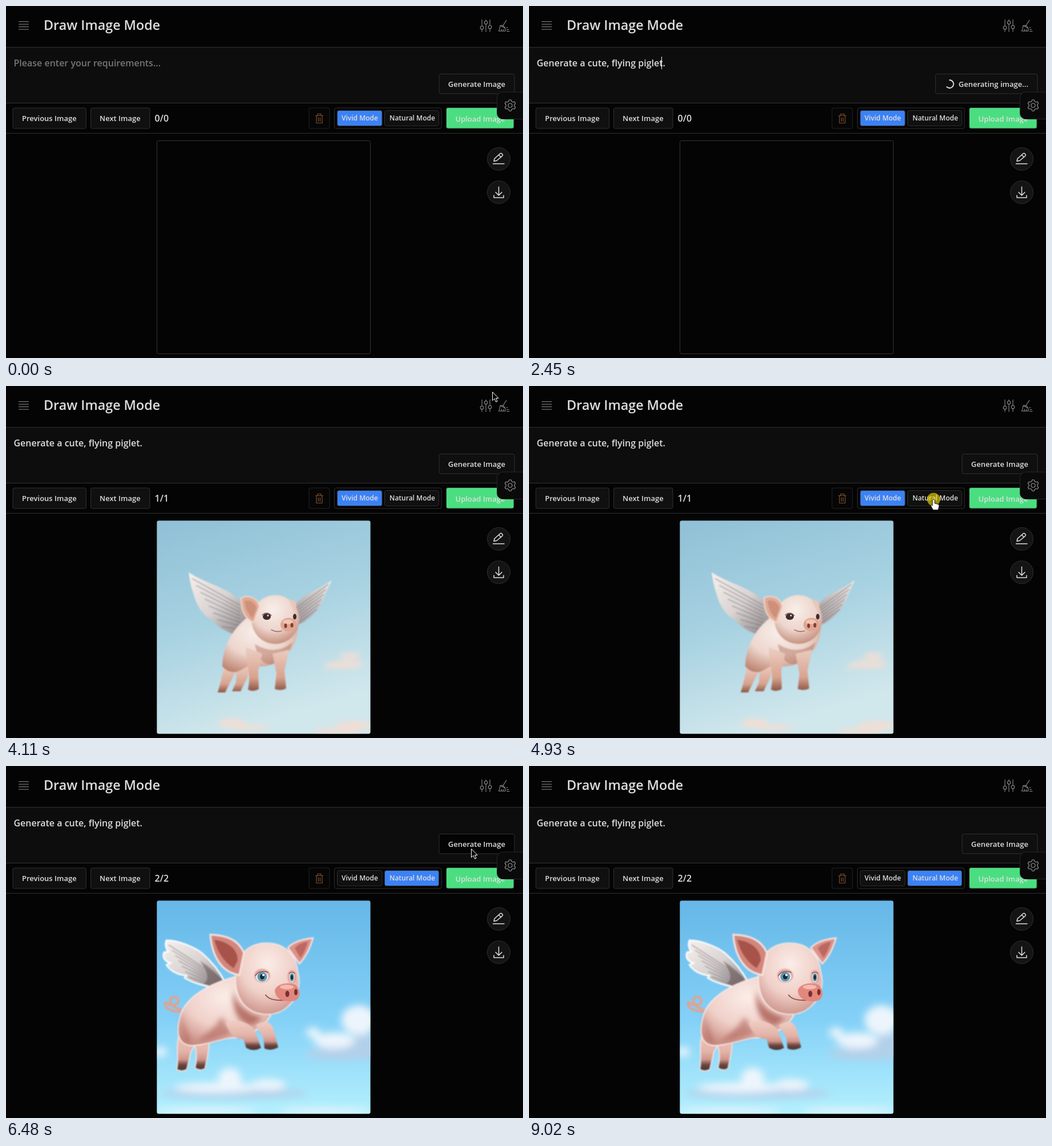
Write an HTML page that moves like this. It is 906 px wide and 618 px high and loops after 9680 ms.

```html
<!DOCTYPE html>
<html lang="en">
<head>
<meta charset="utf-8">
<title>Draw Image Mode</title>
<style>
html, body { margin: 0; width: 100%; height: 100%; overflow: hidden; background: #040404; }
svg { display: block; width: 906px; height: 618px; }
text { font-family: "Open Sans", sans-serif; font-weight: 600; font-size: 13px; fill: #dedede; }
.btn { fill: #101010; stroke: #303030; }
.big { font-size: 16px; }
.small { font-size: 12px; }
.line { fill: none; stroke-linecap: round; stroke-linejoin: round; }
</style>
</head>
<body>
<svg viewBox="0 0 906 618" xmlns="http://www.w3.org/2000/svg">
<defs>
  <clipPath id="frame"><rect x="264.5" y="236.5" width="374" height="374" rx="3"/></clipPath>
  <filter id="b1" x="-20%" y="-20%" width="140%" height="140%"><feGaussianBlur stdDeviation=".8"/></filter>
  <filter id="b4" x="-40%" y="-40%" width="180%" height="180%"><feGaussianBlur stdDeviation="5"/></filter>
  <filter id="b7" x="-40%" y="-40%" width="180%" height="180%"><feGaussianBlur stdDeviation="7"/></filter>
  <linearGradient id="sky1" x1="0" y1="0" x2=".3" y2="1">
    <stop offset="0" stop-color="#90c0d6"/><stop offset=".5" stop-color="#a6d1e1"/><stop offset="1" stop-color="#d0e7ec"/>
  </linearGradient>
  <linearGradient id="sky2" x1="0" y1="0" x2="0" y2="1">
    <stop offset="0" stop-color="#66b7e8"/><stop offset=".55" stop-color="#83d0f7"/><stop offset="1" stop-color="#b4f0fd"/>
  </linearGradient>
  <linearGradient id="leg1" x1="0" y1="0" x2="0" y2="1">
    <stop offset="0" stop-color="#ecd0c5"/><stop offset=".7" stop-color="#d9a28e"/><stop offset="1" stop-color="#8e5546"/>
  </linearGradient>
  <linearGradient id="leg2" x1="0" y1="0" x2="0" y2="1">
    <stop offset="0" stop-color="#efcdc4"/><stop offset=".5" stop-color="#e3b3a8"/><stop offset=".7" stop-color="#d0968b"/><stop offset=".84" stop-color="#6b4640"/><stop offset="1" stop-color="#47302d"/>
  </linearGradient>
  <radialGradient id="skin1" cx=".45" cy=".3" r=".75">
    <stop offset="0" stop-color="#f8efea"/><stop offset=".55" stop-color="#edd6cd"/><stop offset="1" stop-color="#bf8572"/>
  </radialGradient>
  <radialGradient id="skin2" cx=".5" cy=".3" r=".75">
    <stop offset="0" stop-color="#fbece8"/><stop offset=".55" stop-color="#f0d1c9"/><stop offset="1" stop-color="#c98c83"/>
  </radialGradient>
  <linearGradient id="wing" x1="0" y1="0" x2="1" y2="1">
    <stop offset="0" stop-color="#f6f1ee"/><stop offset=".5" stop-color="#d9d3d2"/><stop offset="1" stop-color="#857d80"/>
  </linearGradient>
  <linearGradient id="wingR" x1="1" y1="0" x2="0" y2="1">
    <stop offset="0" stop-color="#efecea"/><stop offset="1" stop-color="#a0979a"/>
  </linearGradient>
</defs>

<rect width="906" height="618" fill="#040404"/>
<rect y="73" width="906" height="97" fill="#0d0d0d"/>
<path d="M0 72.5H906M0 170.5H906M0 223.5H906" stroke="#303030"/>
<g class="line" stroke="#8c8c8c" stroke-width="1.1">
  <path d="M22.5 27.5H39.5M22.5 32H39.5M22.5 36.5H39.5M22.5 41H39.5"/>
  <path d="M834 24V35M834 41V45M841 24V26M841 32V45M848 24V34M848 40V45"/>
  <circle cx="834" cy="38" r="2.8"/><circle cx="841" cy="29" r="2.8"/><circle cx="848" cy="37" r="2.8"/>
  <path d="M877 25 870.5 35M866 34.5Q871 32.5 874.5 38.5M866 34.5Q865.5 40 863.5 44H875L874.5 38.5ZM867.5 44 868.5 41M871.5 44V41M877 38H879M877.5 41.5H881M877.5 44.5H882"/>
</g>
<text x="66" y="42" style="font-size:23.3px">Draw Image Mode</text>
<text id="prompt" class="big" x="13.5" y="105.5"></text>
<path id="caret" d="M232.5 89V111" stroke="#f2f2f2"/>

<rect id="genBox" class="btn" y="119.5" height="34.5" rx="3"/>
<text id="genText" x="875" y="142" text-anchor="end"></text>
<path id="spin" class="line" stroke="#e2e2e2" stroke-width="1.8"/>

<rect class="btn" x="12" y="179" width="128.5" height="36" rx="3"/>
<text x="28" y="202">Previous Image</text>
<rect class="btn" x="148.5" y="179" width="103.5" height="36" rx="3"/>
<text x="164" y="202">Next Image</text>
<text id="count" class="big" x="260.5" y="203"></text>
<rect x="531" y="179" width="36" height="36" rx="3" fill="#060606" stroke="#222"/>
<path class="line" stroke="#80502e" stroke-width="1.2" d="M542.5 192.5H555.5M546 192V189.5H552V192M544 193V205.5H554V193M547.5 196V202.5M550.5 196V202.5"/>
<rect x="575.5" y="179" width="187.5" height="36" rx="3" fill="#050505" stroke="#303030"/>
<rect id="vivid" class="btn" x="580.5" y="183.5" width="78.5" height="27" rx="3"/>
<text class="small" x="588" y="201">Vivid Mode</text>
<rect id="natural" class="btn" x="663.5" y="183.5" width="95" height="27" rx="3"/>
<text class="small" x="672" y="201">Natural Mode</text>
<rect class="btn" x="771.5" y="178.5" width="118.5" height="36.5" rx="3" style="fill:#4ade80"/>
<text x="787.5" y="203">Upload Image</text>
<rect x="860.5" y="151" width="60" height="47.5" rx="10" fill="#0a0a0a" stroke="#262626"/>
<g class="line" stroke="#929292" stroke-width="1.2"><path id="gear"/><circle cx="883.5" cy="174.5" r="3.5"/></g>

<g fill="#141414" stroke="#303030"><circle cx="863.5" cy="268.5" r="20"/><circle cx="863.5" cy="327" r="20"/></g>
<g class="line" stroke="#e0e0e0" stroke-width="1.5">
  <path d="M853.5 277H873M855 272.5 856 268 866 259Q867.5 258 869 259.5L870 260.5Q871 262 870 263L860 271.5ZM863.5 261.5 867.5 265.5"/>
  <path d="M863.5 317.5V332M858 327 863.5 332.5 869 327M855 332.5V336.5H872V332.5"/>
</g>

<rect x="264.5" y="236.5" width="374" height="374" rx="3" fill="#040404" stroke="#353535"/>
<g id="pig1" clip-path="url(#frame)">
  <rect x="264" y="236" width="375" height="375" fill="url(#sky1)"/>
  <g id="clouds1" filter="url(#b4)"></g>
  <g filter="url(#b1)">
    <path fill="url(#wing)" d="M320 327C350 348 398 355 417 385L426 418 404 437C386 432 370 423 362 412 345 403 333 385 328 363 323 350 322 338 320 327Z"/>
    <path fill="url(#wingR)" d="M571 341C545 360 520 364 504 388L510 420C530 413 551 392 560 365Z"/>
    <g id="feathers1"></g>
    <path fill="url(#leg1)" d="M383 490 376 520 371 538H384L402 502ZM404 500 403 520 396 536H411L423 512 427 488Z"/>
    <path fill="url(#skin1)" d="M428 402C398 425 380 455 379 492Q388 504 404 502C418 497 424 488 436 491Q458 496 478 482C503 468 510 445 512 425Z"/>
    <path fill="#a8624d" opacity=".4" d="M436 453Q473 475 502 450 494 478 466 489 443 490 436 453Z"/>
    <path fill="url(#leg1)" d="M420 458C421 485 427 500 426 520L424 533Q434 538 443 532L442 500 449 470ZM467 470 474 505 471 532Q482 536 491 531L488 500 496 463Z"/>
    <ellipse cx="472" cy="410" rx="42" ry="43" fill="url(#skin1)"/>
    <path fill="#e2a992" stroke="#f1d8cc" stroke-width="2" d="M412 372C426 366 441 372 444 387L434 415C418 409 412 392 412 372Z"/>
    <path fill="#bb7b66" opacity=".55" d="M418 377Q435 375 439 390L432 408Q420 397 418 377Z"/>
    <path fill="#ecc6b6" d="M496 377Q509 372 509 390L505 395Z"/>
  </g>
  <path class="line" stroke="#8a4d42" stroke-width="1.3" d="M465 428Q474 433 483 430M449 402Q457 395 465 403"/>
  <ellipse cx="457" cy="405" rx="7" ry="5.5" fill="#3b2b2e"/><ellipse cx="506" cy="405" rx="3" ry="5" fill="#3b2b2e"/>
  <circle cx="459" cy="403" r="1.5" fill="#e8eef4"/>
  <ellipse cx="495" cy="419" rx="14" ry="12" fill="#e2a592"/><ellipse cx="494" cy="414" rx="9" ry="4" fill="#f1c5b4"/>
  <g fill="#7b4037"><ellipse cx="490" cy="421" rx="2.5" ry="4"/><ellipse cx="501" cy="420" rx="2.5" ry="4"/></g>
</g>
<g id="pig2" clip-path="url(#frame)">
  <rect x="264" y="236" width="375" height="375" fill="url(#sky2)"/>
  <g id="clouds2" filter="url(#b7)"></g>
  <g filter="url(#b1)">
    <path fill="url(#wing)" stroke="#fff" stroke-width="2.5" d="M281 306C300 305 330 318 343 328 361 344 374 360 384 380L372 391C348 386 327 381 313 372L316 368C296 366 285 356 281 349L288 346C276 342 274 334 277 327L284 326Q277 316 281 306Z"/>
    <g id="feathers2"></g>
    <path fill="#6e5c5c" opacity=".6" d="M340 342Q366 358 382 380L372 390Q356 386 346 382 362 372 340 342Z"/>
    <path class="line" stroke="#e5a08d" stroke-width="4" d="M306 431C288 431 277 425 279 415M279 415C290 422 303 421 302 411 300 402 286 404 288 414Q292 424 305 427"/>
    <path fill="url(#leg2)" stroke="#f9e9e6" stroke-width="1.5" d="M304 468C296 495 304 510 299 533Q308 538 317 533L324 502 337 480ZM327 481Q338 505 331 530 340 537 349 531L354 505 358 475Z"/>
    <path fill="url(#skin2)" stroke="#f9e9e6" stroke-width="2" d="M405 369C365 380 321 399 307 434 295 470 303 490 325 491 350 490 375 480 390 478 420 477 450 462 464 438Z"/>
  </g>
  <g filter="url(#b4)" fill="#a04a40">
    <path opacity=".7" d="M398 392Q404 428 450 442L432 456Q395 452 398 392Z"/>
    <path opacity=".5" d="M332 484Q360 468 378 440L396 470Q366 482 332 484Z"/>
    <path opacity=".35" d="M308 436Q304 464 314 486L326 484Q314 460 308 436Z"/>
  </g>
  <g filter="url(#b1)">
    <path fill="url(#leg2)" d="M385 451C401 443 428 449 437 466L447 495Q434 502 421 495L416 479Q397 482 385 451ZM438 455Q461 440 469 462L477 494Q464 501 453 496L451 478Z"/>
    <path fill="url(#skin2)" stroke="#fbeeeb" stroke-width="1.5" d="M408 340C418 318 440 309 462 311 490 313 509 333 511 360 520 389 505 414 492 424 473 441 437 440 418 420 399 400 399 362 408 340Z"/>
    <path fill="#d3867b" stroke="#f9e4df" stroke-width="3" d="M358 296C385 297 407 304 417 328L409 367C380 363 361 337 358 296Z"/>
    <path fill="#98413a" opacity=".75" d="M365 305C389 308 407 322 406 342L399 355Q373 338 365 305Z"/>
    <path fill="#dd9188" stroke="#f9e4df" stroke-width="2.5" d="M538 302C519 304 503 309 494 319L514 347C524 337 532 323 538 302Z"/>
    <path fill="#a54f47" opacity=".6" d="M529 308Q513 311 506 320L516 337Q525 325 529 308Z"/>
    <ellipse cx="449" cy="368" rx="14" ry="12" fill="#cf7f74" opacity=".6"/>
    <ellipse cx="501" cy="370" rx="8" ry="12" fill="#cf7f74" opacity=".5"/>
  </g>
  <path class="line" stroke="#9d4d49" stroke-width="2" d="M455 402Q463 413 488 411"/>
  <ellipse cx="449" cy="370" rx="11" ry="9" fill="#e8eff3"/><ellipse cx="501" cy="371" rx="4.5" ry="9" fill="#dfeaf0"/>
  <ellipse cx="449" cy="370" rx="8.5" ry="8.5" fill="#5f96b0"/><ellipse cx="501" cy="371" rx="3.5" ry="7" fill="#538aa5"/>
  <ellipse cx="449" cy="370" rx="4" ry="4.5" fill="#1b2935"/><ellipse cx="501" cy="371" rx="2" ry="4" fill="#1b2935"/>
  <circle cx="451" cy="367" r="2" fill="#fff"/>
  <path class="line" stroke="#935149" stroke-width="1.5" d="M437 368Q444 358 459 362M496 364Q501 360 506 364"/>
  <path fill="#e2877d" d="M471 394C473 383 494 378 507 384 517 392 517 408 506 412 489 416 472 410 471 394Z"/>
  <ellipse cx="492" cy="388" rx="12" ry="4" fill="#f4b9b1"/>
  <g fill="#7b302f"><ellipse cx="493" cy="400" rx="3.5" ry="5.5"/><ellipse cx="508" cy="397" rx="3" ry="5.5"/></g>
</g>

<circle id="click" r="11.5" fill="#ffe600" opacity=".6"/>
<g id="cursor">
  <path id="arrow" d="M.5 .5V15.5L4 12.2 6.5 18 9 17 6.5 11.5H11Z" fill="#000" stroke="#fff"/>
  <path id="hand" d="M-2 1Q0-1.5 2 1V7L8 8.5Q10.5 9.5 9.5 13L8 18.5H-1L-5 11Q-4 8.5-2 11Z" fill="#fff" stroke="#111"/>
  <path id="beam" d="M-3-8.5H-1L0-7.5 1-8.5H3M0-7.5V7.5M-3 8.5H-1L0 7.5 1 8.5H3" fill="none" stroke="#ddd"/>
</g>
</svg>
<script>
const LOOP = 9680;
const $ = id => document.getElementById(id);
const set = (id, attrs) => { for (const k in attrs) $(id).setAttribute(k, attrs[k]); };
const show = (id, on) => set(id, { visibility: on ? "visible" : "hidden" });
const within = (t, a, b) => t >= a && t < b;
const lerp = (a, b, p) => a + (b - a) * p;
const mix = (a, b, p) => [lerp(a[0], b[0], p), lerp(a[1], b[1], p)];

// Static details
function clouds(id, color, list) {
  $(id).innerHTML += list.map(([x, y, rx, ry]) =>
    `<ellipse cx="${x}" cy="${y}" rx="${rx}" ry="${ry}" fill="${color}"/>`).join("");
}
function feathers(id, n, base0, base1, tip0, tip1) {
  let d = "";
  for (let i = 0; i < n; i++) {
    const p = i / (n - 1);
    d += `M${mix(base0, base1, p)}L${mix(tip0, tip1, p)}`;
  }
  $(id).innerHTML += `<path d="${d}" stroke="#6f676b" stroke-width="1.6" opacity=".5"/>`;
}
clouds("clouds1", "#efded6", [[595, 489, 32, 7], [603, 474, 18, 6], [570, 492, 14, 4], [395, 592, 24, 8], [430, 600, 32, 5], [610, 596, 32, 8], [580, 606, 40, 6]]);
clouds("clouds2", "#b3d0ea", [[590, 505, 65, 12], [630, 490, 30, 20], [400, 575, 130, 9]]);
clouds("clouds2", "#edf5fc", [[575, 482, 36, 14], [618, 446, 30, 26], [538, 468, 12, 9], [392, 548, 20, 18], [370, 565, 75, 9], [460, 560, 30, 10], [270, 502, 12, 8], [350, 606, 90, 5], [560, 606, 80, 5]]);
feathers("feathers1", 8, [410, 385], [412, 428], [326, 338], [378, 422]);
feathers("feathers1", 6, [508, 390], [512, 416], [565, 348], [545, 392]);
feathers("feathers2", 7, [376, 373], [370, 388], [285, 314], [320, 370]);

let gear = "";
for (let i = 0; i < 72; i++) {
  const a = i / 72 * 2 * Math.PI, r = 8.6 + 1.2 * Math.tanh(3 * Math.cos(6 * a));
  gear += (i ? "L" : "M") + (883.5 + r * Math.sin(a)).toFixed(2) + " " + (174.5 - r * Math.cos(a)).toFixed(2);
}
set("gear", { d: gear + "Z" });

// Pointer: [start, end, steps, stop time, ...way points]
const moves = [
  [70, 530, 7, 670, [857, 492], [520, 290], [141, 108]],
  [670, 671, 1, 1330, [124, 97], [124, 97]],
  [1330, 2160, 13, 2230, [150, 100], [480, 118], [820, 137]],
  [4040, 4860, 12, 5260, [857, 2], [775, 130], [655, 204], [709, 199]],
  [5260, 6080, 12, 7800, [712, 195], [760, 168], [815, 145]],
  [8460, 8960, 7, 9020, [797, 1], [805, 260], [817, 547]]
];
function pointer(t) {
  const m = moves.find(m => within(t, m[0], m[3]));
  if (!m) return null;
  const [start, end, steps, , ...pts] = m;
  const k = Math.min(steps, Math.floor((t - start) / (end - start) * steps + .01)) / steps;
  const u = k * k * (3 - 2 * k) * (pts.length - 1);
  const i = Math.min(pts.length - 2, Math.floor(u));
  return mix(pts[i], pts[i + 1], u - i);
}

const buttons = [[759, 119, 891, 154], [581, 184, 659, 210], [664, 184, 758, 210], [771, 179, 890, 215], [860, 151, 906, 198]];
const inside = ([x, y], [l, t, r, b]) => x >= l && x <= r && y >= t && y <= b;
function cursorKind(p, t) {
  if (within(t, 6210, 7800)) return "arrow";
  if (buttons.some(b => inside(p, b))) return "hand";
  return inside(p, [0, 73, 906, 170]) ? "beam" : "arrow";
}

function arc(cx, cy, r, from, sweep) {
  const at = a => `${cx + r * Math.sin(a * Math.PI / 180)} ${cy - r * Math.cos(a * Math.PI / 180)}`;
  return `M${at(from)}A${r} ${r} 0 ${sweep > 180 ? 1 : 0} 1 ${at(from + sweep)}`;
}

function draw(t) {
  const typed = t >= 930, busy = within(t, 2230, 2520) || within(t, 6210, 6480);
  const images = t < 2520 ? 0 : t < 6480 ? 1 : 2;
  const p = pointer(t);

  $("prompt").textContent = typed ? "Generate a cute, flying piglet." : "Please enter your requirements...";
  $("prompt").style.fill = typed ? "#dedede" : "#767676";
  set("caret", { d: `M${typed ? 232.5 : 14.5} 89V111` });
  show("caret", within(t, 400, 1590) || within(t, 2120, 2650) || within(t, 3180, 3710) || within(t, 4240, 4770));

  const left = busy ? 712.5 : 759;
  const hover = p && inside(p, [left, 119, 891, 154]);
  set("genBox", { x: left, width: 891 - left, style: `fill:${hover ? "#040404" : "#0f0f0f"}` });
  $("genText").textContent = busy ? "Generating image..." : "Generate Image";
  show("spin", busy);
  const turn = t < 4000 ? (t - 2450) * .36 : (t - 6410) * .36 + 150;
  set("spin", { d: arc(737, 137, 7, turn, 225) });

  $("count").textContent = `${images}/${images}`;
  const natural = t >= 5000;
  const tab = on => ({ style: `fill:${on ? "#3b82f6" : "#101010"}` });
  set("vivid", tab(!natural));
  set("natural", tab(natural));
  show("pig1", images === 1);
  show("pig2", images === 2);

  show("click", within(t, 670, 1330) || within(t, 2160, 2230) || within(t, 4930, 5000) || within(t, 6140, 6210));
  const kind = p && cursorKind(p, t);
  for (const id of ["arrow", "hand", "beam"]) show(id, id === kind);
  if (p) {
    set("cursor", { transform: `translate(${p.map(Math.round)})` });
    set("click", { cx: p[0], cy: p[1] });
  }
}

function tick(now) {
  draw(now % LOOP);
  requestAnimationFrame(tick);
}
draw(0);
requestAnimationFrame(tick);
</script>
</body>
</html>
```
